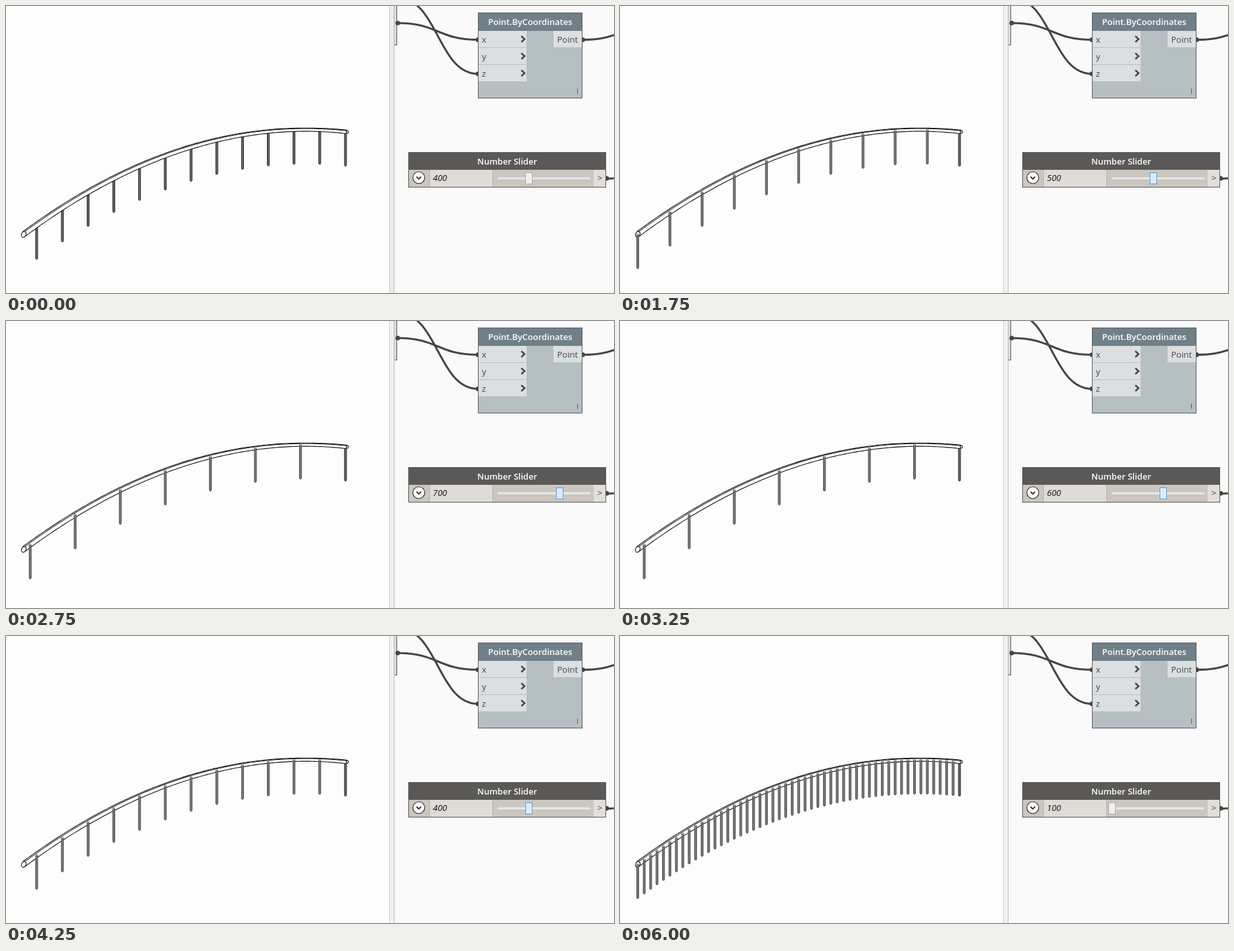
Animation of 925 by 438 pixels, one loop 7000 ms. Source, as an HTML page with a canvas:

```html
<!DOCTYPE html>
<html lang="en">
<head>
<meta charset="utf-8">
<title>Railing slider</title>
<style>
  html, body { margin: 0; width: 100%; height: 100%; overflow: hidden; background: #fdfdfd; }
  canvas { display: block; }
</style>
</head>
<body>
<canvas id="stage" width="925" height="438"></canvas>
<script>
const ctx = document.getElementById('stage').getContext('2d');
const LOOP = 7000;
const FONT = '"Open Sans", sans-serif';
const DARK = '#454545';

// start time, slider value, post spacing, thumb style
const STEPS = [
  [0, 400, 400, 'idle'],
  [750, 400, 400, 'hover'],
  [1250, 400, 400, 'drag'],
  [1750, 500, 500, 'drag'],
  [2500, 600, 600, 'drag'],
  [2750, 700, 700, 'drag'],
  [3000, 800, 800, 'drag'],
  [3250, 600, 700, 'drag'],
  [3500, 600, 600, 'drag'],
  [3750, 500, 600, 'drag'],
  [4000, 500, 500, 'drag'],
  [4250, 400, 400, 'drag'],
  [4750, 300, 300, 'drag'],
  [5000, 200, 200, 'drag'],
  [5500, 100, 100, 'drag'],
  [5750, 100, 100, 'hover'],
  [6000, 100, 100, 'idle']
];
const THUMB = {
  idle: ['#f0f0f0', '#acacac'],
  hover: ['#dcecfc', '#7eb4ea'],
  drag: ['#daecfc', '#569de5']
};

const RAIL = { left: 27, right: 516.5, peak: 456, bend: 0.000867 };
const footY = x => 241.2 + RAIL.bend * (x - RAIL.peak) ** 2;
const axisY = x => footY(x) - 52.5;
const steepness = x => Math.abs(2 * RAIL.bend * (x - RAIL.peak)) / 0.744;
const halfHeight = x => 2.4 + 2.5 * steepness(x);
const topY = x => axisY(x) - halfHeight(x);
const innerY = x => topY(x) + 0.8 + 1.5 * steepness(x);
const bottomY = x => axisY(x) + halfHeight(x);

function box(x, y, w, h, fill, stroke) {
  ctx.fillStyle = fill;
  ctx.fillRect(x, y, w, h);
  if (stroke) {
    ctx.strokeStyle = stroke;
    ctx.lineWidth = 1;
    ctx.strokeRect(x + 0.5, y + 0.5, w - 1, h - 1);
  }
}

function label(text, x, y, color, style = '', align = 'left') {
  ctx.font = `${style} 13px ${FONT}`;
  ctx.textAlign = align;
  ctx.fillStyle = color;
  ctx.fillText(text, x, y);
}

function dot(x, y, r, fill, stroke, width = 1) {
  ctx.beginPath();
  ctx.arc(x, y, r, 0, 2 * Math.PI);
  ctx.fillStyle = fill;
  ctx.fill();
  if (stroke) {
    ctx.strokeStyle = stroke;
    ctx.lineWidth = width;
    ctx.stroke();
  }
}

function polyline(points, color, width) {
  ctx.beginPath();
  points.forEach(p => ctx.lineTo(...p));
  ctx.strokeStyle = color;
  ctx.lineWidth = width;
  ctx.stroke();
}

function wire(x0, y0, ...curve) {
  ctx.beginPath();
  ctx.moveTo(x0, y0);
  ctx.bezierCurveTo(...curve);
  ctx.strokeStyle = DARK;
  ctx.lineWidth = 3;
  ctx.stroke();
}

function curvePoints(y, from, to) {
  const points = [];
  for (let x = from; x < to; x += 4) points.push([x, y(x)]);
  points.push([to, y(to)]);
  return points;
}

function cap(x, y, rx, ry, tilt) {
  ctx.beginPath();
  ctx.ellipse(x, y, rx, ry, tilt, 0, 2 * Math.PI);
  ctx.fillStyle = '#fdfdfd';
  ctx.fill();
  ctx.strokeStyle = '#111';
  ctx.lineWidth = 1.1;
  ctx.stroke();
}

function drawRail() {
  const upper = curvePoints(topY, 25.5, 519);
  const lower = curvePoints(bottomY, 29.5, 518);
  ctx.beginPath();
  upper.concat(lower.slice().reverse()).forEach(p => ctx.lineTo(...p));
  ctx.fillStyle = '#fdfdfd';
  ctx.fill();
  cap(519.3, 192.1, 1.8, 2, 0);
  polyline(upper, '#111', 1.1);
  polyline(curvePoints(innerY, 29, 519), '#111', 1);
  polyline(lower, '#111', 1.1);
  cap(27, 348.6, 3.4, 4.6, 0.45);
}

function drawPost(x, top, fill, edge) {
  const bottom = footY(x);
  ctx.beginPath();
  ctx.roundRect(x - 1.5, top, 3, bottom - top, 1.5);
  ctx.fillStyle = fill;
  ctx.fill();
  ctx.strokeStyle = edge;
  ctx.lineWidth = 1;
  ctx.stroke();
}

function drawRailing(spacing, solid) {
  const gap = spacing * 0.0979;
  const posts = [];
  for (let x = RAIL.right; x > RAIL.left - 1; x -= gap) posts.push(x);
  const [end, ...others] = posts;
  const behind = x => drawPost(x, axisY(x), '#6c6c6c', '#222');
  behind(end);
  if (solid) others.forEach(behind);
  drawRail();
  if (!solid) {
    others.forEach(x => {
      drawPost(x, axisY(x) - 0.7, '#7c7c7c', '#484848');
      dot(x, axisY(x), 1.2, '#b4b4b4');
    });
  }
}

function drawPanel(t) {
  box(591, 0, 334, 438, '#fafafa');
  box(583, 0, 8, 438, t < 1000 ? '#ebebeb' : '#f1f1f1');
  box(583, 0, 1, 438, '#cfcfcf');
  box(590, 0, 1, 438, '#bcbcbc');
  box(591, 0, 4, 60, '#dedcd9');
  box(594, 0, 1, 60, '#555');
  box(591, 59, 4, 1, '#555');
}

function drawWires() {
  wire(596, 26, 657, 26, 657, 51.5, 718, 51.5);
  wire(596, -12, 657, -12, 657, 103.5, 718, 103.5);
  wire(878, 51.5, 902, 51.5, 914, 48, 926, 44);
  wire(914, 263.5, 918, 263.5, 922, 263, 926, 263);
  dot(596, 26, 3.5, DARK);
  dot(914, 263, 3.5, DARK);
  dot(718, 51.5, 3.5, DARK);
  dot(718, 103.5, 3.5, DARK);
  dot(877.5, 51.5, 3.5, DARK);
}

function drawPointNode() {
  box(718, 10, 159, 131, '#b6c0c3', '#565c5f');
  box(719, 11, 157, 27, '#718088');
  label('Point.ByCoordinates', 797.5, 29, '#fff', '600', 'center');
  ['x', 'y', 'z'].forEach((name, i) => {
    const y = 38 + 26 * i;
    box(719, y, 73, 25, '#dbdfe1');
    label(name, 724, y + 18, '#444');
    polyline([[784, y + 8], [789, y + 12.5], [784, y + 17]], '#444', 2.4);
  });
  box(833, 38, 43, 25, '#dbdfe1');
  label('Point', 838.5, 56, '#444');
  box(869, 126, 1, 8, '#566063');
}

function drawSliderNode(value, mode) {
  box(612, 223, 301, 54, '#cbc6be', '#5b5957');
  box(612, 223, 301, 27, '#5b5957');
  label('Number Slider', 762.5, 242, '#fff', '600', 'center');

  dot(628, 262, 9, '#fff', '#333', 1.2);
  polyline([[624.5, 260.5], [628, 264], [631.5, 260.5]], '#333', 1.8);

  box(644, 250, 97, 26, '#dfdbd6');
  box(644, 250, 1, 26, '#bbb6ae');
  box(740, 250, 1, 26, '#b5b0a8');
  label(value, 649.5, 267, '#111', 'italic');

  box(748, 261, 141, 4, '#e7eaea', '#dcdcda');
  const x = Math.round(743 + (value - 100) * 0.1565);
  box(x, 254, 11, 18, ...THUMB[mode]);

  box(894, 250, 18, 26, '#e2ded9');
  label('>', 903.5, 267, '#444', '', 'center');
}

function render(t) {
  const [, value, spacing, mode] = STEPS.findLast(step => step[0] <= t);
  box(0, 0, 925, 438, '#fdfdfd');
  drawRailing(spacing, t < 1750);
  drawPanel(t);
  drawWires();
  drawPointNode();
  drawSliderNode(value, mode);
}

const start = performance.now();
function tick() {
  render((performance.now() - start) % LOOP);
  requestAnimationFrame(tick);
}
tick();
</script>
</body>
</html>
```
